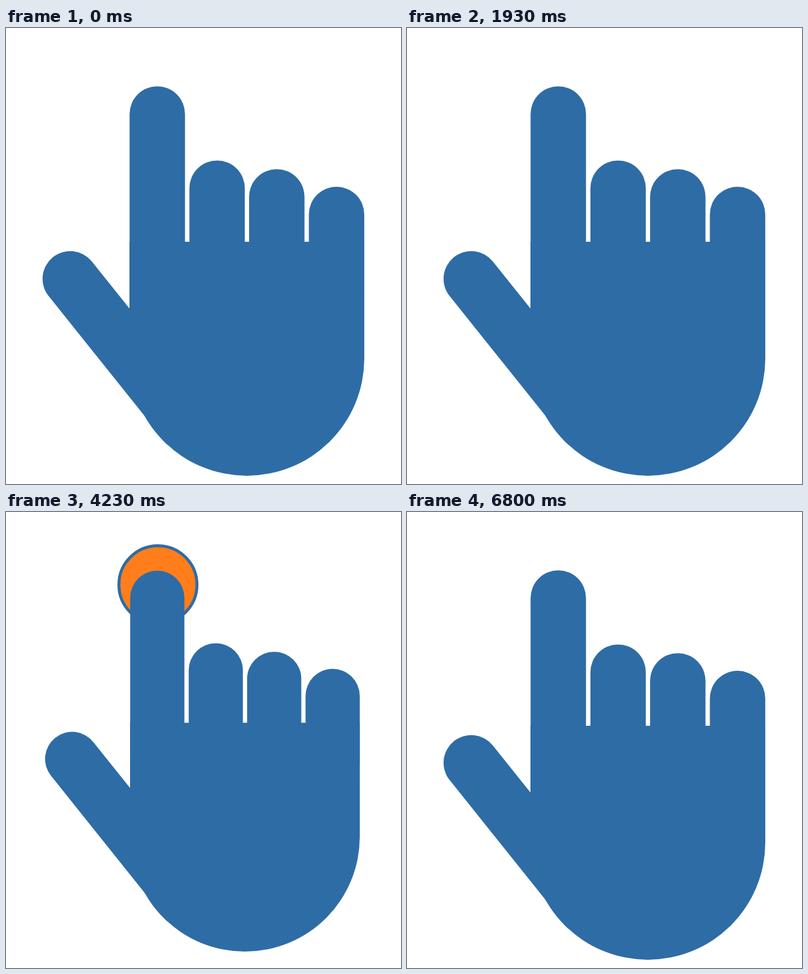
An HTML page for the animation above (8.01 s loop, 624x721 px).

```html
<!DOCTYPE html>
<html lang="en">
<head>
<meta charset="utf-8">
<title>Tap</title>
<style>
  html, body { margin: 0; width: 100%; height: 100%; overflow: hidden; background: #fff; }
  svg { display: block; width: 100%; height: 100%; }
</style>
</head>
<body>
<svg viewBox="0 0 624 721">
  <circle id="ripple" r="92.5" fill="#ff7e1b" stroke="#2e6ca6" stroke-width="7"/>
  <g id="hand" fill="#2e6ca6">
    <path d="M195 338H566V522.5A185.5 185.5 0 0 1 195 522.5Z"/>
    <path d="M239 136V400M333.5 253.2V400M427.8 267V400M522.2 294.8V400M101.5 396.5L254.4 587.8"
          fill="none" stroke="#2e6ca6" stroke-width="87.5" stroke-linecap="round"/>
  </g>
</svg>
<script>
  const LOOP = 8010, TAP = 2000;
  const PRESS = 267, RELEASE = 733, GROW = 760, FADE = 800;
  const hand = document.getElementById('hand');
  const ripple = document.getElementById('ripple');

  const ramp = (t, a, b) => Math.min(1, Math.max(0, (t - a) / (b - a)));
  const smooth = p => p * p * (3 - 2 * p);
  const easeOut = p => 1 - (1 - p) ** 3;
  const place = (el, x, y, s) =>
    el.setAttribute('transform', `translate(${x} ${y}) scale(${s})`);

  // Two poses per 100 ms, held for 30 and 70 ms
  const step = t => Math.floor(t / 100) * 100 + (t % 100 >= 30 ? 33 : 0);

  function draw(ms) {
    const t = step(ms % LOOP) % TAP;
    const press = smooth(ramp(t, 0, PRESS)) - smooth(ramp(t, PRESS, RELEASE));
    const s = 1 - 0.0228 * press;
    place(hand, 239 * (1 - s), 115 * (1 - s), s);
    place(ripple, 240, 115, easeOut(ramp(t, 0, GROW)));
    ripple.setAttribute('opacity', t > 0 ? 1 - ramp(t, PRESS, FADE) : 0);
  }

  const start = performance.now();
  function tick() {
    draw(performance.now() - start);
    requestAnimationFrame(tick);
  }
  tick();
</script>
</body>
</html>
```
